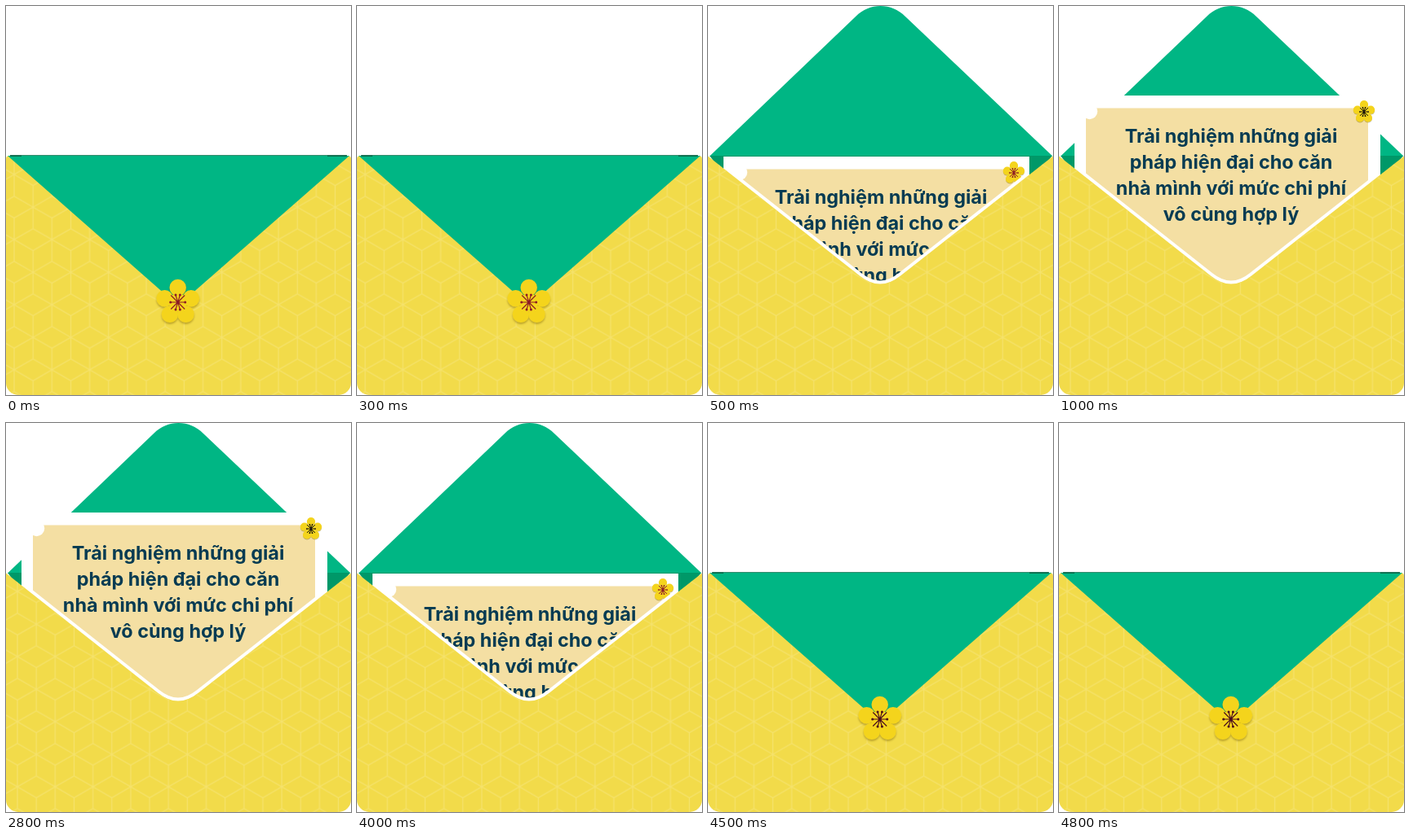
These frames come from a looping animation (423 by 478 pixels, 5 s). An HTML page:

```html
<!DOCTYPE html>
<html lang="vi">
<head>
<meta charset="utf-8">
<title>Envelope</title>
<style>
  html, body { margin: 0; width: 100%; height: 100%; overflow: hidden; background: #fff; }
  svg { display: block; width: 100%; height: 100%; }
  .scene, .closed, .open, .card { animation: 5s step-end infinite; }
  .scene { animation-name: ink; }
  .closed { animation-name: closed; }
  .open { animation-name: open; }
  .card { animation-name: rise; }
  .message { font: 700 23.4px Inter, "Open Sans", sans-serif; fill: #063b52; text-anchor: middle; }
  @keyframes closed { 0% { visibility: visible; } 10% { visibility: hidden; } 90%, 100% { visibility: visible; } }
  @keyframes open { 0% { visibility: hidden; } 10% { visibility: visible; } 90%, 100% { visibility: hidden; } }
  @keyframes rise { 0% { transform: none; } 20% { transform: translate(-1px, -75px); } 80%, 100% { transform: none; } }
  @keyframes ink { 0% { color: #8c1c26; } 20% { color: #17120c; } 80% { color: #8c1c26; } 90%, 100% { color: #4a0c1e; } }
</style>
</head>
<body>
<svg class="scene" viewBox="0 0 423 478" preserveAspectRatio="none">
  <defs>
    <pattern id="cubes" width="46.3" height="80" patternUnits="userSpaceOnUse" patternTransform="translate(10 33.7)">
      <path fill="none" stroke="#f5e26c" stroke-width="1.2" d="
        M0 66.7V80M46.3 66.7V80M0 0V40M46.3 0V40M23.15 26.7V80
        M0 13.3L23.15 0L46.3 13.3M0 13.3L23.15 26.7L46.3 13.3
        M0 40L23.15 53.4L46.3 40M0 66.7L23.15 53.4L46.3 66.7"/>
    </pattern>
    <pattern id="cubesOpen" href="#cubes" patternTransform="translate(14 33.7)"/>
    <filter id="shadow" x="-30%" y="-30%" width="160%" height="160%">
      <feDropShadow dx="0" dy="2" stdDeviation="1.2" flood-color="#7a6200" flood-opacity=".45"/>
    </filter>
    <clipPath id="cardArea"><rect x="19" y="0" width="375" height="478"/></clipPath>
    <path id="closedBody" d="M0 188Q0 184 4 184H419Q423 184 423 188V463A15 15 0 0 1 408 478H15A15 15 0 0 1 0 463Z"/>
    <path id="front" d="M0 184.6L186 331.6Q211 351.6 236 331.6L423 184.6V463A15 15 0 0 1 408 478H15A15 15 0 0 1 0 463Z"/>
    <g id="petals" fill="#f4d41f" filter="url(#shadow)">
      <circle cy="-18" r="10.2"/>
      <circle cx="16.2" cy="-4.7" r="10.2"/>
      <circle cx="9.8" cy="14.8" r="10.2"/>
      <circle cx="-9.8" cy="14.8" r="10.2"/>
      <circle cx="-16.2" cy="-4.7" r="10.2"/>
      <circle r="11"/>
    </g>
    <g id="stamens">
      <path d="M-9 0H9M-8.5 -8.5L8.5 8.5M8.5 -8.5L-8.5 8.5M-2.7 -9L2.7 9M2.7 -9L-2.7 9" fill="none" stroke="currentColor"/>
      <g fill="currentColor" stroke="none">
        <circle cx="-9" r="1.5"/><circle cx="9" r="1.5"/>
        <circle cx="-2.7" cy="-9" r="1.5"/><circle cx="2.7" cy="-9" r="1.5"/>
        <circle cx="-2.7" cy="9" r="1.5"/><circle cx="2.7" cy="9" r="1.5"/>
        <circle r="2"/>
      </g>
    </g>
  </defs>

  <g class="closed">
    <use href="#closedBody" fill="#f2db4a"/>
    <use href="#closedBody" fill="url(#cubes)"/>
    <path d="M2 184H421L230 351.5Q211 368 192 351.5Z" fill="#00b684"/>
    <path d="M5 183.6H418" stroke="#23805f"/>
    <path d="M5 184.2H19M394 184.2H418" stroke="#0b6b4c" stroke-width="1.4"/>
    <g transform="translate(210.7 364)">
      <use href="#petals"/>
      <use href="#stamens" stroke-width="1.1"/>
    </g>
  </g>

  <g class="open">
    <path d="M2 184.5L181 13C190 4 200 0 211.5 0S233 4 242 13L422.5 184.5Z" fill="#00b684"/>
    <path d="M2 184H422L394 220H29Z" fill="#009868"/>
    <g clip-path="url(#cardArea)">
      <g class="card">
        <path d="M10 185H404V440H10Z" fill="#fff"/>
        <path d="M34 200.5H380V430H34Z" fill="#f4dfa3"/>
        <circle cx="38.5" cy="204.5" r="9.7" fill="#fff"/>
        <g class="message">
          <text x="212" y="242.5">Trải nghiệm những giải</text>
          <text x="212" y="274.5">pháp hiện đại cho căn</text>
          <text x="212" y="306.5">nhà mình với mức chi phí</text>
          <text x="212" y="338.5">vô cùng hợp lý</text>
        </g>
        <g transform="translate(375 205)">
          <use href="#petals" transform="scale(.5)"/>
          <use href="#stamens" transform="scale(.58)" stroke-width="1.7"/>
        </g>
      </g>
      <path d="M0 184.6L186 331.6Q211 351.6 236 331.6L423 184.6" fill="none" stroke="#fff" stroke-width="8"/>
    </g>
    <use href="#front" fill="#f2db4a"/>
    <use href="#front" fill="url(#cubesOpen)"/>
  </g>
</svg>
</body>
</html>
```
